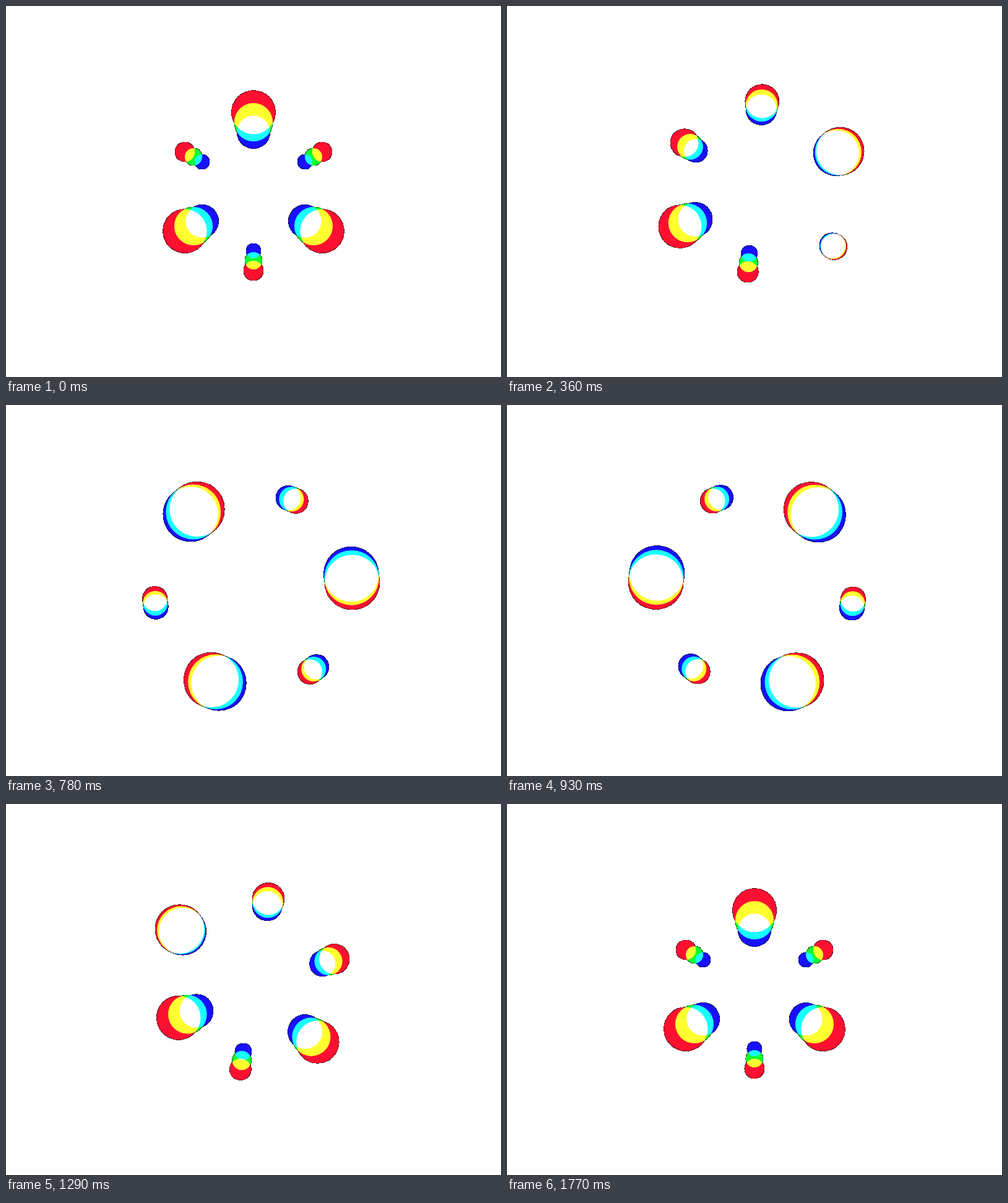
Write an HTML page with a canvas that moves like this. It is 800 px wide and 600 px high and loops after 1.8 s.

```html
<!DOCTYPE html>
<html lang="en">
<head>
<meta charset="utf-8">
<title>Six dots</title>
<style>
  html, body { margin: 0; width: 100%; height: 100%; overflow: hidden; background: #fff; }
  canvas { display: block; width: 800px; height: 600px; }
</style>
</head>
<body>
<canvas id="stage" width="800" height="600"></canvas>
<script>
  const W = 800, H = 600;
  const LOOP = 1800, HALF = LOOP / 2, STEP = 30;
  const RING = 160, BIG = 0.2775, SMALL = 0.125;
  const BLACK = 0xff000000, WHITE = 0xffffffff;

  // near: ring scale when drawn in, power: sharpness of the swing
  const LAYERS = [
    { color: 'rgb(255,16,48)', near: 0.8, power: 12 },
    { color: 'rgb(16,255,48)', near: 0.7, power: 14 },
    { color: 'rgb(24,16,255)', near: 0.6, power: 16 }
  ];

  const ctx = document.getElementById('stage').getContext('2d', { willReadFrequently: true });

  const clamp = v => Math.min(1, Math.max(0, v));
  const mix = (a, b, p) => a + (b - a) * p;

  function ease(v, g) {
    const x = clamp(v);
    return x < 0.5 ? 0.5 * (2 * x) ** g : 1 - 0.5 * (2 - 2 * x) ** g;
  }

  // Goes out in the first half and back in the second, dot after dot
  function outAndBack(t, k, g) {
    const u = (t - 306 - 24 * k) / HALF + 0.5;
    return ease(u, g) - ease(u - 1, g);
  }

  function drawDot(t, k, layer, turn) {
    const dist = RING * mix(layer.near, 1, outAndBack(t, k, 12));
    const swap = outAndBack(t, k, 16);
    const ratio = k % 2 ? mix(SMALL, BIG, swap) : mix(BIG, SMALL, swap);
    const angle = (120 - 60 * k + turn) * Math.PI / 180;
    ctx.beginPath();
    ctx.arc(W / 2 + dist * Math.sin(angle), H / 2 - dist * Math.cos(angle), dist * ratio, 0, 2 * Math.PI);
    ctx.fill();
  }

  // Untouched black becomes the white backdrop; soft edges stay dark
  function clearBackdrop() {
    const image = ctx.getImageData(0, 0, W, H);
    const pixels = new Uint32Array(image.data.buffer);
    for (let i = 0; i < pixels.length; i++) {
      if (pixels[i] === BLACK) pixels[i] = WHITE;
    }
    ctx.putImageData(image, 0, 0);
  }

  function draw(t) {
    const x = t / LOOP;
    const sway = 15 * ease(1 - Math.abs(2 * x - 1), 2);

    ctx.globalCompositeOperation = 'source-over';
    ctx.fillStyle = '#000';
    ctx.fillRect(0, 0, W, H);

    ctx.globalCompositeOperation = 'lighten';
    for (const layer of LAYERS) {
      ctx.fillStyle = layer.color;
      const turn = sway + 120 * ease(x, layer.power);
      for (let k = 0; k < 6; k++) drawDot(t, k, layer, turn);
    }
    clearBackdrop();
  }

  let shown = -1;
  function tick() {
    const t = Math.floor((performance.now() % LOOP) / STEP) * STEP;
    if (t !== shown) draw(shown = t);
    requestAnimationFrame(tick);
  }
  tick();
</script>
</body>
</html>
```
